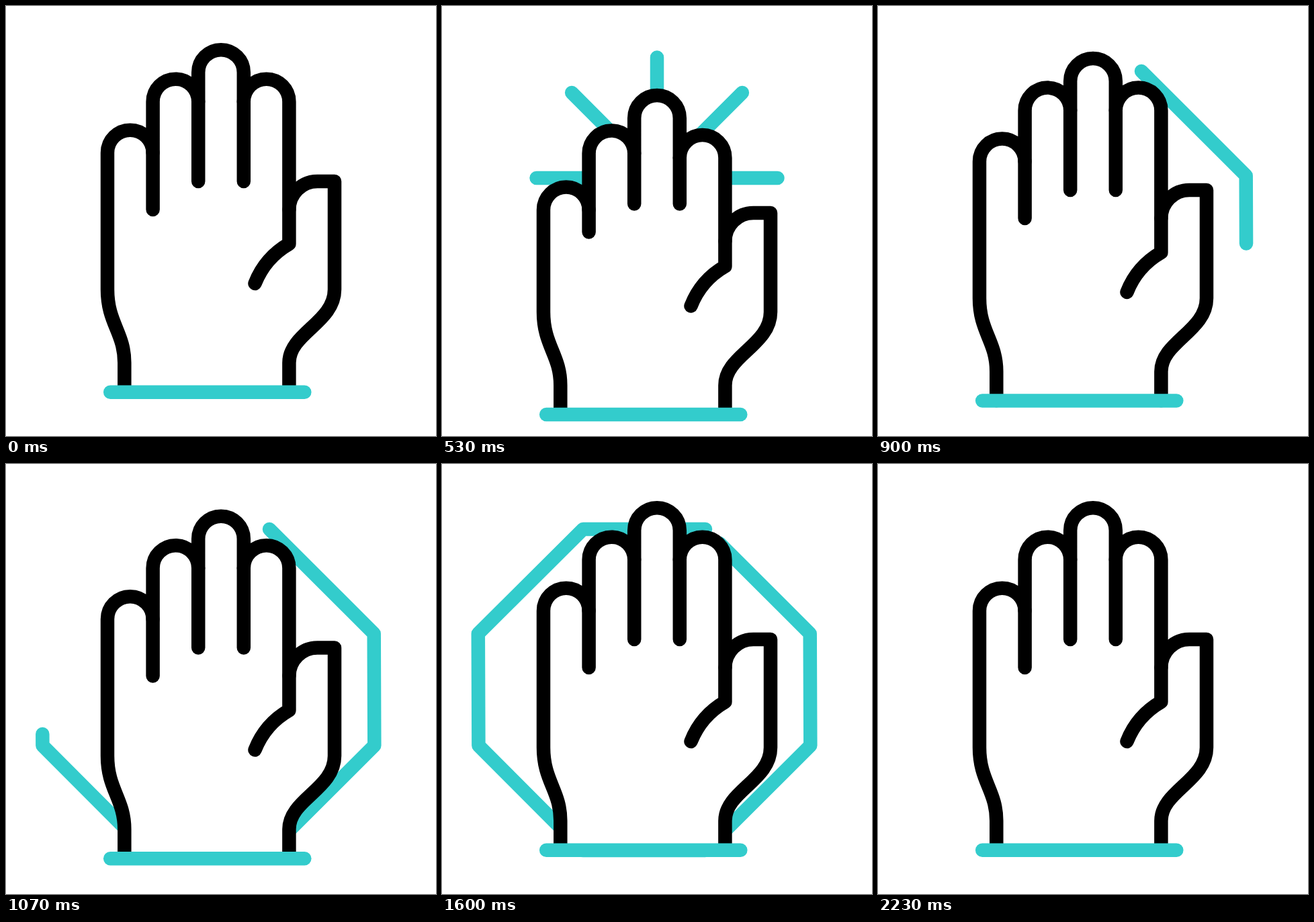
Animation of 640 by 640 pixels, one loop 2500 ms. Source, as an HTML page:

```html
<!DOCTYPE html>
<html lang="en">
<head>
<meta charset="utf-8">
<title>Stop hand</title>
<style>
  html, body { margin: 0; width: 100%; height: 100%; overflow: hidden; background: #fff; }
  svg { display: block; width: 100%; height: 100%; }
  path { fill: none; stroke: #000; stroke-width: 20.5; stroke-linecap: round; stroke-linejoin: round; }
  .accent { stroke: #3cc; }
  #outline { fill: #fff; }
</style>
</head>
<body>
<svg viewBox="0 0 640 640">
  <path id="rays" class="accent"/>
  <path id="sign" class="accent" pathLength="1"
    d="M392 97L547.7 252.5L548.3 419L392 575H210L54.4 419L53.8 252.5L210 97Z"/>
  <g id="hand">
    <path id="outline"/>
    <path id="creases"/>
    <path class="accent" d="M155.2 574.7H444.3"/>
  </g>
</svg>
<script>
const LOOP = 2500;
const [rays, sign, hand, outline, creases] =
  ["rays", "sign", "hand", "outline", "creases"].map(id => document.getElementById(id));

// Symmetric ease: cubic-bezier(.44, 0, .56, 1)
function ease(x) {
  if (x <= 0) return 0;
  if (x >= 1) return 1;
  const k = 0.44;
  let lo = 0, hi = 1, u;
  for (let i = 0; i < 24; i++) {
    u = (lo + hi) / 2;
    const v = 1 - u;
    if (3 * k * u * v * v + 3 * (1 - k) * u * u * v + u ** 3 < x) lo = u;
    else hi = u;
  }
  return u * u * (3 - 2 * u);
}

const span = (t, from, to) => ease((t - from) / (to - from));

// Keys are [time, value] pairs
function track(t, keys) {
  let value = keys[0][1];
  for (let i = 1; i < keys.length; i++) {
    value += (keys[i][1] - keys[i - 1][1]) * span(t, keys[i - 1][0], keys[i][0]);
  }
  return value;
}

function drawHand(t) {
  const drop = track(t, [[0, 0], [533, 33.4], [738, 0], [983, 16.7], [1233, 0]]);
  const curl = track(t, [[0, 0], [533, 1], [883, 0]]);
  const pinky = 218.5 + 51.5 * curl;
  const ring = 142.5 + 43.5 * curl;
  const middle = 99 + 34.5 * curl;
  const index = 142.5 + 50 * curl;
  const thumb = 261 + 13.6 * curl;
  const tip = (x, y) => `L${x} ${y}a33.8 33.8 0 0 1 67.6 0`;

  hand.setAttribute("transform", `translate(0 ${drop})`);
  outline.setAttribute("d", "M176.3 574V531C176.3 486 151 472 151 422" +
    tip(151, pinky) + tip(218.6, ring) + tip(286.2, middle) + tip(353.8, index) +
    `V${thumb + 42}a42 42 0 0 1 42 -42H489V422C489 471 421.4 487 421.4 531V574`);
  creases.setAttribute("d", `M218.6 ${pinky}V303M286.2 ${ring}V261M353.8 ${index}V261` +
    `M421.4 ${thumb + 42}V354C397 368 380 389 370.5 413`);
}

function drawRays(t) {
  const head = 208 * span(t, 310, 610);
  const tail = 208 * span(t, 405, 705);
  let d = "";
  if (head - tail > 0.1) {
    for (let i = 0; i < 5; i++) {
      const c = Math.cos(i * Math.PI / 4), s = Math.sin(i * Math.PI / 4);
      d += `M${320 + tail * c} ${256 - tail * s}L${320 + head * c} ${256 - head * s}`;
    }
  }
  rays.setAttribute("d", d);
}

function drawSign(t) {
  const start = span(t, 1530, 2230);
  const length = span(t, 700, 1333) - start;
  sign.style.display = length > 0.0005 ? "" : "none";
  sign.style.strokeDasharray = `${length} 2`;
  sign.style.strokeDashoffset = -start;
}

function render() {
  const t = performance.now() % LOOP;
  drawRays(t);
  drawSign(t);
  drawHand(t);
  requestAnimationFrame(render);
}
render();
</script>
</body>
</html>
```
